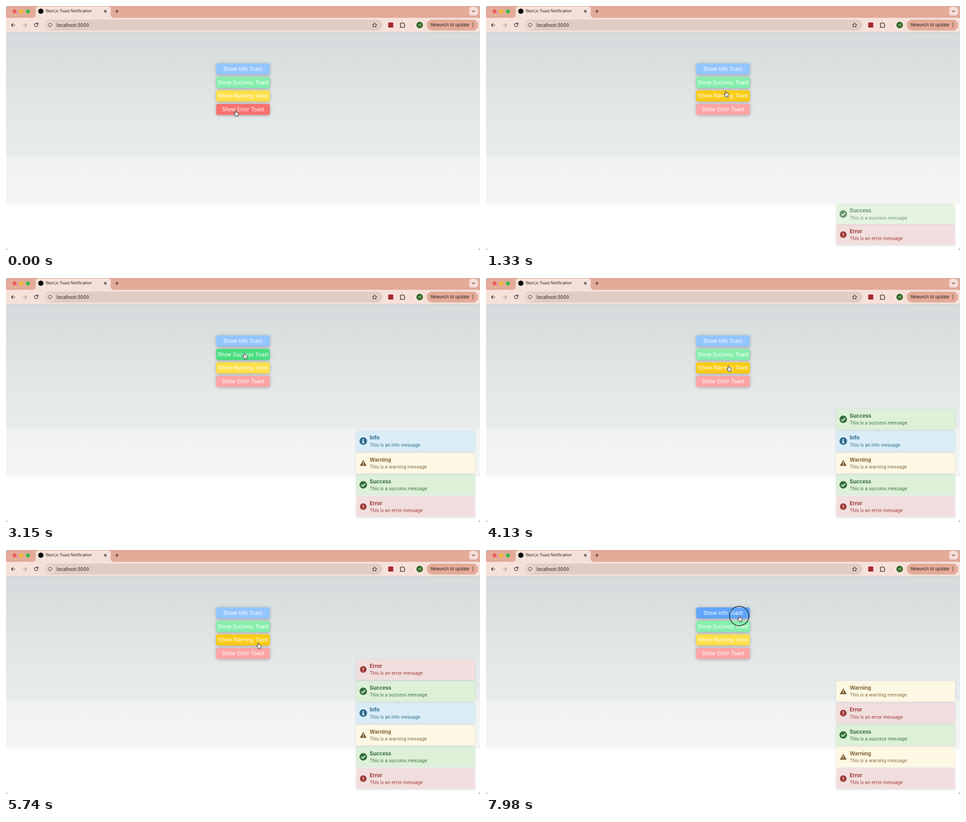
Animation, 1041 px wide and 538 px high, one loop 8000 ms. Source, as an HTML page:

```html
<!DOCTYPE html>
<html lang="en">
<head>
<meta charset="utf-8">
<title>Toast Notification</title>
<style>
  html, body { margin: 0; width: 100%; height: 100%; overflow: hidden; background: #86b4d4; }
  svg { display: block; width: 100%; height: 100%; }
  text { font-family: Inter, Roboto, sans-serif; }
  .line { fill: none; stroke: #2a211f; stroke-width: 1.2; stroke-linecap: round; stroke-linejoin: round; }
  .ui { fill: #2a211f; }
  .button rect { filter: drop-shadow(0 0 5px rgba(0,0,0,.15)) drop-shadow(0 2px 2px rgba(0,0,0,.13)); }
  .button text { fill: #fff; font-size: 11.4px; text-anchor: middle; }
  .toast > rect { filter: drop-shadow(0 1px 2px rgba(0,0,0,.13)); }
  .title { font-size: 11.4px; font-weight: 700; }
  .message { font-size: 10px; }
</style>
</head>
<body>
<svg viewBox="0 0 1041 538" preserveAspectRatio="none">
  <defs>
    <linearGradient id="sky" gradientUnits="userSpaceOnUse" x1="0" y1="58" x2="0" y2="440">
      <stop offset="0" stop-color="#d5dbdc"/>
      <stop offset=".24" stop-color="#dce1e1"/>
      <stop offset=".48" stop-color="#e3e8e8"/>
      <stop offset=".68" stop-color="#e8ebec"/>
      <stop offset=".71" stop-color="#e9ecec"/>
      <stop offset=".73" stop-color="#f0f3f2"/>
      <stop offset=".9" stop-color="#f3f5f4"/>
      <stop offset=".97" stop-color="#f4f4f4"/>
      <stop offset=".992" stop-color="#f6f6f6"/>
      <stop offset="1" stop-color="#fff"/>
    </linearGradient>
    <clipPath id="window"><rect width="1041" height="538" rx="6"/></clipPath>
  </defs>

  <g clip-path="url(#window)">
    <rect width="1041" height="538" fill="#fff"/>
    <rect y="58" width="1041" height="382" fill="url(#sky)"/>

    <!-- tab strip -->
    <rect width="1041" height="27" fill="#e3ab98"/>
    <circle cx="19" cy="12" r="4.4" fill="#f25a55"/>
    <circle cx="33.5" cy="12" r="4.4" fill="#f6b62d"/>
    <circle cx="48" cy="12" r="4.4" fill="#2fc144"/>
    <path d="M58 26Q65 26 65 19V8Q65 1 72 1H223Q230 1 230 8V19Q230 26 237 26Z" fill="#f6e1da"/>
    <circle cx="76.5" cy="11.5" r="5.8"/>
    <text x="87.5" y="14.4" font-size="8.5" class="ui">Next.js Toast Notification</text>
    <path class="line" d="M215.7 9.2l4.8 4.8m0-4.8l-4.8 4.8M239.8 11.5h7.4m-3.7-3.7v7.4"/>
    <rect x="1017" y="2" width="19.5" height="19" rx="6" fill="#f5ded6"/>
    <path class="line" d="M1024.3 10.3l2.5 2.5 2.5-2.5"/>

    <!-- toolbar -->
    <rect y="26" width="1041" height="32" fill="#f6e1da"/>
    <rect y="57.5" width="1041" height="1" fill="#cfc6c3"/>
    <path class="line" d="M20 42h-8m3.6-3.7L11.9 42l3.7 3.7"/>
    <path class="line" style="stroke:#a3938e" d="M37 42h8m-3.6-3.7l3.7 3.7-3.7 3.7"/>
    <path class="line" d="M70.2 43.2a3.9 3.9 0 1 1-.9-4.1l1.2 1.2m0-3v3.1h-3"/>
    <rect x="85" y="30" width="742" height="24" rx="12" fill="#e0cdc6"/>
    <circle cx="97" cy="42" r="8.7" fill="#f6e1da"/>
    <circle class="line" cx="97" cy="42" r="4.5" style="stroke-width:1"/>
    <path class="line" style="stroke-width:1.1" d="M97 41.8v2.3M97 39.8v.1"/>
    <text x="111" y="45.5" font-size="10.1" class="ui">localhost:3000</text>
    <path class="line" style="stroke-width:1" d="M809.5 37l1.5 3.3 3.6.4-2.7 2.4.8 3.5-3.2-1.8-3.2 1.8.8-3.5-2.7-2.4 3.6-.4Z"/>
    <rect x="839.5" y="36.5" width="11" height="11" fill="#a3262e"/>
    <path class="line" d="M866 38.2h2.6a1.6 1.6 0 0 1 3.2 0h2.8v3a1.6 1.6 0 0 1 0 3.2v2.8H866v-2.9a1.6 1.6 0 0 0 0-3.2Z"/>
    <rect x="889" y="37" width="1" height="10" fill="#dda593"/>
    <circle cx="908.5" cy="42" r="7.2" fill="#2f6b24"/>
    <text x="908.5" y="44.7" font-size="7.4" text-anchor="middle" fill="#fff">H</text>
    <rect x="924" y="30" width="113" height="24" rx="12" fill="#e3ab98"/>
    <text x="932.5" y="45.3" font-size="9.3" class="ui">Relaunch to update</text>
    <g class="ui"><circle cx="1025.5" cy="38" r="1.1"/><circle cx="1025.5" cy="42" r="1.1"/><circle cx="1025.5" cy="46" r="1.1"/></g>

    <g id="buttons"></g>
    <g id="toasts"></g>

    <circle id="ring" r="21.3" fill="none" stroke="#151515" stroke-width="1.3"/>
    <g id="cursor" stroke-linejoin="round">
      <g id="hand">
        <path fill="#fff" stroke="#111" stroke-width=".95" d="M-1.5 1.2C-1.5-.6.9-.6 1 1L1.2 4.2C1.6 3.4 3 3.5 3.1 4.6 3.5 3.9 4.8 4.1 4.9 5.1 5.5 4.7 6.4 5 6.4 6.2 6.4 8.5 5.8 9.3 5.3 10.5L5.2 12.5H-.6L-.8 11.2C-1.8 9.8-2.8 8.6-3.6 7.6-4.4 6.4-3 5.6-2 6.6L-1.2 7.5Z"/>
        <path fill="none" stroke="#111" stroke-width=".5" d="M1 8.2v2.4M2.6 8.2v2.4M4.1 8.2v2.4"/>
      </g>
      <path id="arrow" fill="#111" stroke="#fff" stroke-width=".8" d="M0 0V11.2L2.6 8.8 4.3 12.6 6 11.8 4.4 8.2H8Z"/>
    </g>
  </g>
</svg>

<script>
const LOOP = 8000, STEP = 70, PRESS = 100, FADE = 300;
const $ = id => document.getElementById(id);

const kinds = {
  Info: {
    base: '#93c5fd', hover: '#60a5fa', bg: '#d9edf7', ink: '#2c6a8a', article: 'an',
    icon: '<circle r="8.3"/><path fill="#fff" d="M-1.3-5H1.1V-2.6H-1.3ZM-2.4-1.4H1.3V3H2.5V4.6H-2.5V3H-1.2V.1H-2.4Z"/>'
  },
  Success: {
    base: '#86efac', hover: '#4ade80', bg: '#ddf0d8', ink: '#35703a', article: 'a',
    icon: '<circle r="8.3"/><path d="M-4 .3L-1.2 3.1 4.2-2.6" fill="none" stroke="#fff" stroke-width="1.9"/>'
  },
  Warning: {
    base: '#fddf47', hover: '#facb15', bg: '#fcf8e3', ink: '#82653a', article: 'a',
    icon: '<path d="M0-6.8L7.7 6.5H-7.7Z"/><path fill="#fcf8e3" d="M-.7-2.5H.7V1.9H-.7ZM-.7 3.2H.7V4.6H-.7Z"/>'
  },
  Error: {
    base: '#fca5a5', hover: '#f87171', bg: '#f2dede', ink: '#9c3a3a', article: 'an',
    icon: '<circle r="7.3"/><path fill="#fff" d="M-.8-3.9H.8V.9H-.8ZM-.8 2.2H.8V3.8H-.8Z"/>'
  }
};
const names = Object.keys(kinds);

// kind, time of appearance, time of removal
const toasts = [
  ['Error', 150, LOOP], ['Success', 1200, 6300], ['Warning', 1820, LOOP],
  ['Info', 2620, 7700], ['Success', 3790, LOOP], ['Error', 5120, LOOP],
  ['Warning', 6380, LOOP]
];
const presses = [70, 1120, 1740, 2520, 3710, 5040, 6300, 7950];

// time, x, y of the pointer tip
const path = [
  [0, 504.5, 230.5], [200, 504.5, 230.5], [840, 524, 189], [910, 525, 178],
  [1190, 525, 178], [1330, 526.5, 188], [1540, 528, 200], [1840, 528, 200],
  [2380, 528, 142], [2760, 527, 142], [3150, 523.5, 166], [3780, 523.5, 166],
  [4480, 541.5, 221.5], [4760, 545.5, 224.3], [5110, 545.5, 224.3],
  [5740, 554, 205], [6370, 554, 205], [7070, 548, 169], [7420, 554, 153],
  [7560, 554.5, 152.6], [7910, 556.2, 145.5], [LOOP, 556.2, 145.5]
];

const top0 = 126.6, pitch = 29.75, btnH = 24.4;
$('buttons').innerHTML = names.map((n, i) => {
  const y = top0 + i * pitch;
  return `<g class="button"><rect x="461.6" y="${y}" width="117.8" height="${btnH}" rx="4"/>
    <text x="520.7" y="${y + 16.2}">Show ${n} Toast</text></g>`;
}).join('');
const rects = [...document.querySelectorAll('.button rect')];

$('toasts').innerHTML = toasts.map(([n]) => {
  const k = kinds[n];
  return `<g class="toast" fill="${k.ink}">
    <rect x="769" width="261" height="45.6" rx="3" fill="${k.bg}"/>
    <g transform="translate(784.6 22.7)">${k.icon}</g>
    <text class="title" x="798.7" y="19.5">${n}</text>
    <text class="message" x="798.9" y="34.6">This is ${k.article} ${n.toLowerCase()} message</text></g>`;
}).join('');
const cards = [...document.querySelectorAll('.toast')];

function pointer(t) {
  const i = path.findIndex(p => p[0] > t);
  const [t0, x0, y0] = path[i - 1], [t1, x1, y1] = path[i];
  const p = (t - t0) / (t1 - t0), e = p * p * (3 - 2 * p);
  return [x0 + (x1 - x0) * e, y0 + (y1 - y0) * e];
}

function show(el, on) { el.style.display = on ? '' : 'none'; }

function draw(t) {
  const [x, y] = pointer(t);
  let over = false;
  rects.forEach((r, i) => {
    const dy = y - top0 - i * pitch, on = dy >= 0 && dy <= btnH;
    over = over || on;
    r.setAttribute('fill', kinds[names[i]][on ? 'hover' : 'base']);
  });

  const at = `translate(${x} ${y})`;
  $('cursor').setAttribute('transform', at);
  $('ring').setAttribute('transform', at);
  show($('hand'), over);
  show($('arrow'), !over);
  show($('ring'), presses.some(p => t >= p && t < p + PRESS));

  let slot = 0;
  toasts.forEach(([, start, end], i) => {
    const live = t >= start && t < end;
    show(cards[i], live);
    if (!live) return;
    const p = Math.min(1, (t - start) / FADE), e = 1 - (1 - p) ** 2.3;
    cards[i].setAttribute('transform', `translate(0 ${481.4 - 48.15 * slot++ + 10 * (1 - e)})`);
    cards[i].setAttribute('opacity', e);
  });
}

const began = performance.now();
function tick() {
  const t = (performance.now() - began) % LOOP;
  draw(Math.floor(t / STEP) * STEP);
  requestAnimationFrame(tick);
}
tick();
</script>
</body>
</html>
```
